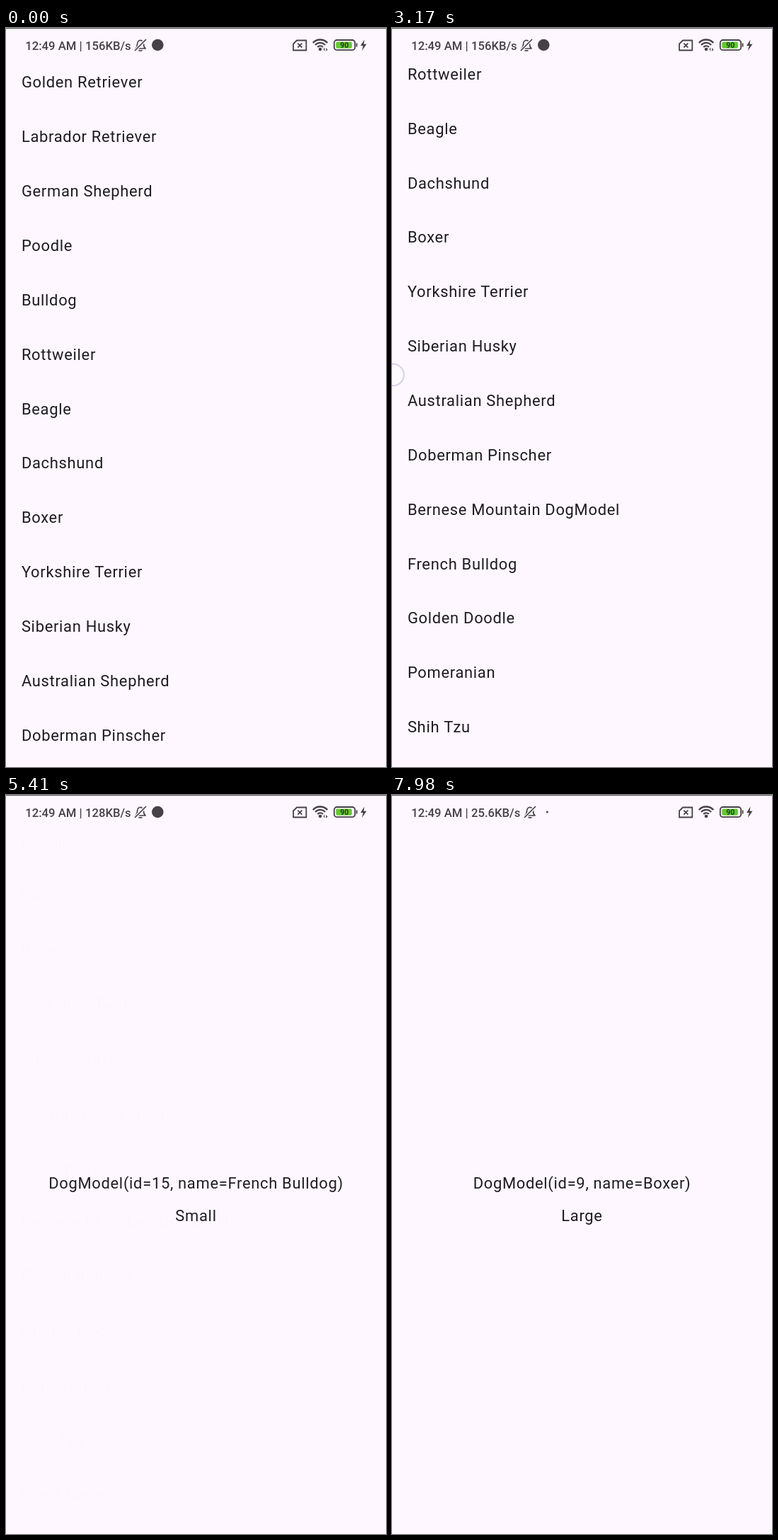
These frames come from a looping animation (537x1044 px, 8000 ms). An HTML page with a canvas:

```html
<!DOCTYPE html>
<html lang="en">
<head>
<meta charset="utf-8">
<style>
  html, body { margin: 0; width: 100%; height: 100%; overflow: hidden; background: #fef7ff; }
  canvas { display: block; }
</style>
</head>
<body>
<canvas id="stage" width="537" height="1044"></canvas>
<script>
const ctx = document.getElementById('stage').getContext('2d');
const W = 537, H = 1044, LOOP = 8000;
const TOP = 38.5, ROW = 76.85;
const BG = '#fef7ff', INK = '#1d1b20', ICON = '#454147';

const dogs = ['Golden Retriever', 'Labrador Retriever', 'German Shepherd', 'Poodle', 'Bulldog',
  'Rottweiler', 'Beagle', 'Dachshund', 'Boxer', 'Yorkshire Terrier', 'Siberian Husky',
  'Australian Shepherd', 'Doberman Pinscher', 'Bernese Mountain DogModel', 'French Bulldog',
  'Golden Doodle', 'Pomeranian', 'Shih Tzu', 'Great Dane'];

// A tap opens the detail page of one row; back closes it.
const taps = [
  { row: 5, size: 'Large', down: 180, up: 570, open: 580, back: 2450, x: 130, y: 466 },
  { row: 14, size: 'Small', down: 3670, up: 3940, open: 3957, back: 5370, x: 130, y: 686 },
  { row: 8, size: 'Large', down: 6972, up: 7070, open: 7080, back: Infinity, x: 45, y: 593 }
];
const drags = [
  { down: 2850, up: 3130, end: 3500, from: 0, lift: 350, to: 472, x0: 120, x1: 1.5, y0: 840, y1: 490 },
  { down: 6110, up: 6230, end: 6780, from: 472, lift: 281, to: 89.5, x0: 181, x1: 184, y0: 625, y1: 816 }
];

const clamp = v => Math.min(1, Math.max(0, v));
const span = (t, start, length) => clamp((t - start) / length);
const mix = (a, b, u) => a + (b - a) * u;

// cubic-bezier(0.4, 0, 0.2, 1)
function ease(x) {
  let lo = 0, hi = 1, s = x;
  for (let i = 0; i < 24; i++) {
    s = (lo + hi) / 2;
    const r = 1 - s;
    if (1.2 * r * r * s + 0.6 * r * s * s + s * s * s < x) lo = s; else hi = s;
  }
  return s * s * (3 - 2 * s);
}

function scrollAt(t) {
  let y = 0;
  for (const d of drags) {
    if (t < d.down) break;
    y = t < d.up
      ? mix(d.from, d.lift, span(t, d.down, d.up - d.down))
      : mix(d.to, d.lift, (1 - span(t, d.up, d.end - d.up)) ** 4);
  }
  return y;
}

function path(points, close) {
  ctx.beginPath();
  points.forEach(([x, y]) => ctx.lineTo(x, y));
  if (close) ctx.closePath();
}

function disc(x, y, r, color) {
  ctx.beginPath();
  ctx.arc(x, y, r, 0, 7);
  ctx.fillStyle = color;
  ctx.fill();
}

function label(text, x, y, align = 'left') {
  ctx.font = '21.95px Roboto, sans-serif';
  ctx.letterSpacing = '0.686px';
  ctx.textAlign = align;
  ctx.fillStyle = INK;
  ctx.fillText(text, x, y + 7.5);
}

function ripple(tap, t, y) {
  const grow = span(t, tap.down, 225), r = mix(W * 0.3, 285, ease(grow));
  const fade = span(t, tap.down, 75) * (1 - span(t, Math.max(tap.up, tap.down + 225), 150));
  if (!fade) return;
  ctx.save();
  ctx.beginPath();
  ctx.rect(0, y - ROW / 2, W, ROW);
  ctx.clip();
  ctx.globalAlpha *= fade * 0.1;
  disc(mix(tap.x, W / 2, grow), mix(tap.y, y, grow), r, INK);
  ctx.restore();
}

function list(t, alpha) {
  const scroll = scrollAt(t), rowY = i => TOP + ROW * (i + 0.5) - scroll;
  ctx.save();
  ctx.globalAlpha = alpha;
  ctx.beginPath();
  ctx.rect(0, TOP, W, H);
  ctx.clip();
  taps.forEach(tap => ripple(tap, t, rowY(tap.row)));
  dogs.forEach((name, i) => label(name, 21.9, rowY(i)));
  ctx.restore();
}

function detail(tap, alpha) {
  ctx.save();
  ctx.globalAlpha = alpha;
  label(`DogModel(id=${tap.row + 1}, name=${dogs[tap.row]})`, W / 2, 548, 'center');
  label(tap.size, W / 2, 594.7, 'center');
  ctx.restore();
}

function pointer(t) {
  for (const p of [...taps, ...drags]) {
    if (t < p.down || t > p.up + 170) continue;
    const u = span(t, p.down, p.up - p.down);
    ctx.save();
    ctx.globalAlpha = 1 - span(t, p.up, 170) * 0.95;
    disc(p.x ?? mix(p.x0, p.x1, u), p.y ?? mix(p.y0, p.y1, u), 15.3, 'rgba(255,255,255,.6)');
    ctx.strokeStyle = '#c8c8e2';
    ctx.lineWidth = 2;
    ctx.stroke();
    ctx.restore();
  }
}

function bell(x) {
  ctx.save();
  ctx.translate(x, 24);
  ctx.lineWidth = 1.7;
  ctx.beginPath();
  ctx.moveTo(-7, 5);
  ctx.quadraticCurveTo(-4.5, 3, -4.5, -1);
  ctx.bezierCurveTo(-4.5, -8.5, 4.5, -8.5, 4.5, -1);
  ctx.quadraticCurveTo(4.5, 3, 7, 5);
  ctx.closePath();
  ctx.stroke();
  path([[-2.5, 8], [2.5, 8]]);
  ctx.stroke();
  path([[-8, 8], [8, -8]]);
  ctx.strokeStyle = BG;
  ctx.lineWidth = 4;
  ctx.stroke();
  ctx.strokeStyle = ICON;
  ctx.lineWidth = 1.7;
  ctx.stroke();
  ctx.restore();
}

function wifi(busy) {
  ctx.lineWidth = 2.3;
  for (const r of [5.2, 9.6, 14]) {
    ctx.beginPath();
    ctx.arc(444, 30.5, r, -Math.PI * 0.76, -Math.PI * 0.24);
    ctx.stroke();
  }
  disc(444, 30, 2.3, ICON);
  if (!busy) return;
  ctx.fillStyle = BG;
  ctx.fillRect(448, 27, 9, 7);
  ctx.fillStyle = ICON;
  path([[448.5, 30], [450.3, 27.5], [450.3, 33]], true);
  ctx.fill();
  path([[452.3, 28], [452.3, 33], [454.5, 30.5]], true);
  ctx.fill();
}

function battery() {
  ctx.lineWidth = 1.8;
  ctx.beginPath();
  ctx.roundRect(463.8, 17, 29.4, 14.2, 4);
  ctx.stroke();
  ctx.beginPath();
  ctx.roundRect(466.3, 19.4, 22.5, 9.4, 2);
  ctx.fillStyle = '#62c92f';
  ctx.fill();
  ctx.fillStyle = ICON;
  ctx.fillRect(494.7, 21.5, 1.8, 5);
  ctx.font = 'bold 10.5px Roboto, sans-serif';
  ctx.textAlign = 'center';
  ctx.fillStyle = '#26382a';
  ctx.fillText('90', 478.3, 28);
  ctx.fillStyle = ICON;
  path([[506.5, 16.5], [501, 25], [504.6, 25], [503, 32], [509.5, 22.8], [505.6, 22.8]], true);
  ctx.fill();
}

function statusBar(t) {
  const idle = t >= 7810;
  const speed = idle ? '25.6' : t < 3900 ? '156' : '128';
  ctx.fillStyle = '#5a575b';
  ctx.fillRect(0, 0, W, 1);
  ctx.fillStyle = ctx.strokeStyle = ICON;
  ctx.font = '500 16.7px Roboto, sans-serif';
  ctx.letterSpacing = '0px';
  ctx.textAlign = 'left';
  ctx.fillText(`12:49 AM | ${speed}KB/s`, 27.2, 30.5);
  bell(idle ? 195 : 190);
  if (idle) disc(219.3, 24, 1.5, ICON);
  else disc(214.3, 24, 8.3, ICON);
  ctx.lineWidth = 1.8;
  ctx.lineJoin = 'round';
  path([[411, 17.5], [424.3, 17.5], [424.3, 31.5], [406, 31.5], [406, 22.5]], true);
  ctx.stroke();
  path([[412.3, 21.7], [418.3, 27.7]]);
  ctx.stroke();
  path([[418.3, 21.7], [412.3, 27.7]]);
  ctx.stroke();
  wifi(!idle);
  battery();
}

function draw(t) {
  const tap = taps.findLast(p => t >= p.open);
  const shown = tap ? ease(span(t, tap.open, 700)) - ease(span(t, tap.back, 700)) : 0;
  ctx.fillStyle = BG;
  ctx.fillRect(0, 0, W, H);
  if (shown < 1) list(t, 1 - shown);
  if (shown > 0) detail(tap, shown);
  statusBar(t);
  pointer(t);
}

const start = performance.now();
function tick() {
  draw((performance.now() - start) % LOOP);
  requestAnimationFrame(tick);
}
tick();
</script>
</body>
</html>
```
